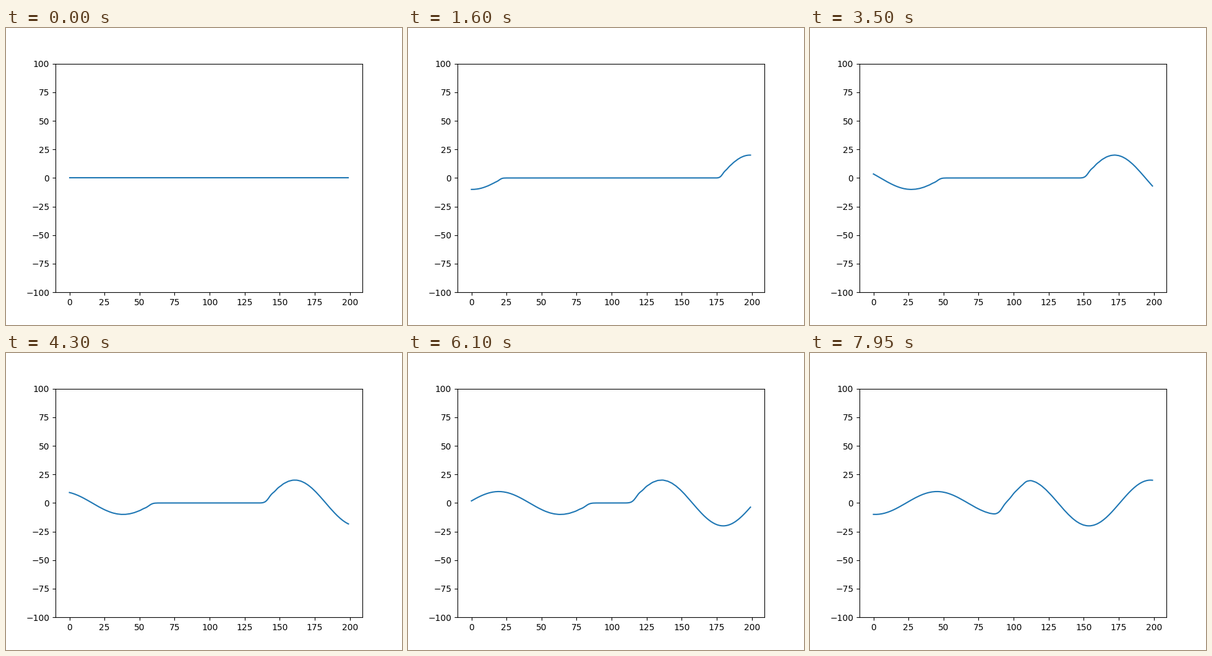
A matplotlib script that plays this animation: 640x480 px, repeating every 8000 ms.

```python
import numpy as np
import matplotlib.pyplot as plt
from matplotlib.animation import FuncAnimation

POINTS = 200
FRAMES = 160
INTERVAL = 50    # ms per frame
SPEED = 0.7      # points per frame
OMEGA = 0.05     # radians per frame


def simulate():
    """Leapfrog wave equation on a string driven at both ends."""
    u = np.zeros((FRAMES, POINTS))
    for n in range(1, FRAMES):
        now, before = u[n - 1], u[max(n - 2, 0)]
        bend = now[2:] - 2 * now[1:-1] + now[:-2]
        u[n, 1:-1] = 2 * now[1:-1] - before[1:-1] + SPEED ** 2 * bend
        u[n, 0] = -10 * np.sin(OMEGA * n)
        u[n, -1] = 20 * np.sin(OMEGA * n)
    return u


waves = simulate()

fig, ax = plt.subplots(figsize=(6.4, 4.8), dpi=100)
line, = ax.plot(np.arange(POINTS), waves[0])
ax.set_ylim(-100, 100)


def update(n):
    line.set_ydata(waves[n])
    return line,


anim = FuncAnimation(fig, update, frames=FRAMES, interval=INTERVAL,
                     repeat=True, repeat_delay=0)
plt.show()
```
